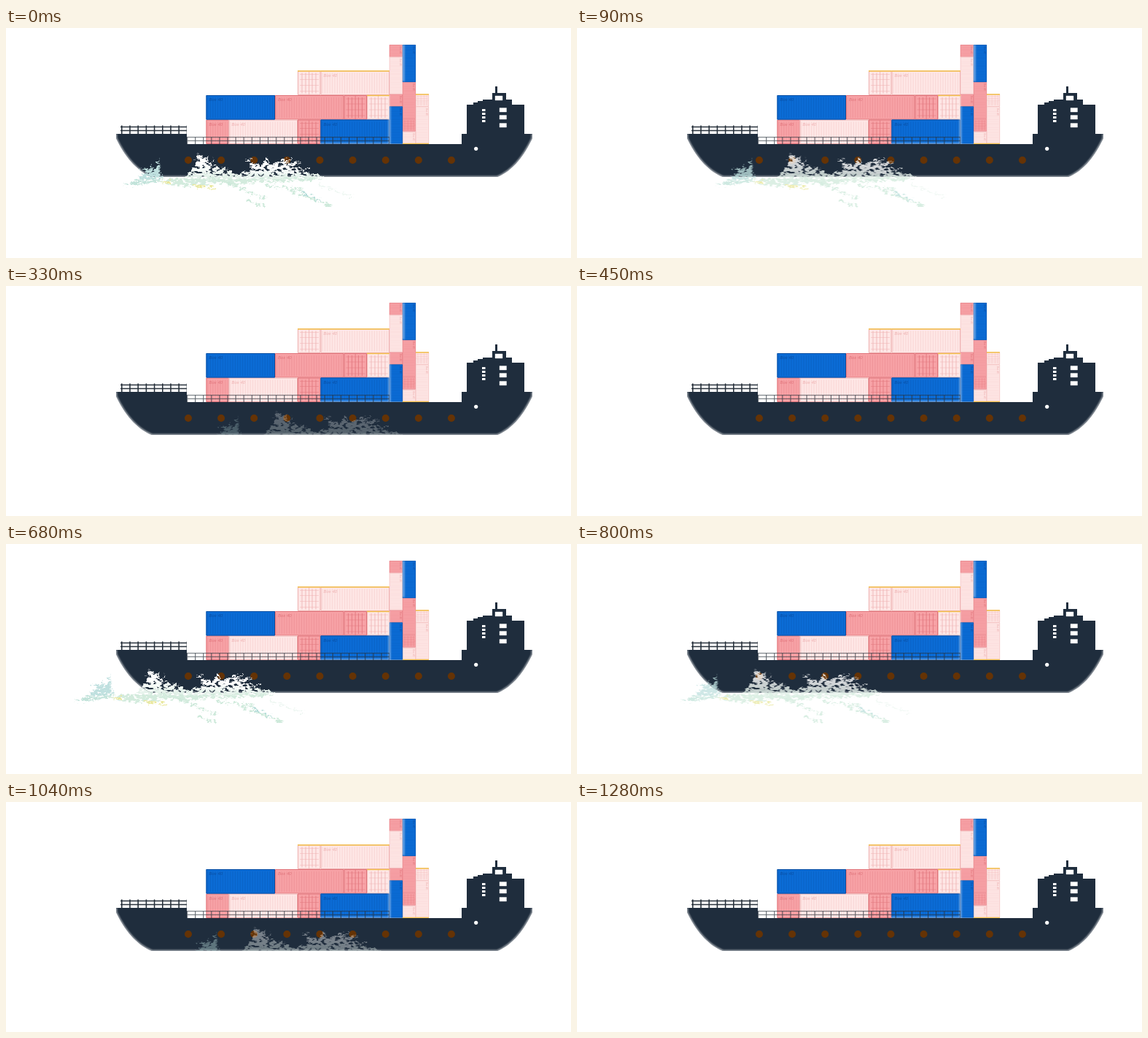
Write an HTML page without scripts that moves like this. It is 775x315 px and loops after 1350 ms.

```html
<!DOCTYPE html>
<html lang="en">
<head>
<meta charset="utf-8">
<title>Cargo ship</title>
<style>
  html, body { margin: 0; width: 100%; height: 100%; overflow: hidden; background: #fff; }
  svg { display: block; width: 775px; height: 315px; }
  text { font: italic 6px "Liberation Sans", Arial, sans-serif; fill: var(--line); }

  .pink { color: #f7a2a6; --line: #e0747b; }
  .pale { color: #fee7e6; --line: #eeb0b0; }
  .blue { color: #0b6cd6; --line: #0a4fa3; }
  .rib { stroke: var(--line); opacity: .3; }
  .frame { fill: none; stroke: var(--line); }
  .gold { stroke: #f3c14b; stroke-width: 1.6; }

  .drift { animation: drift 1350ms infinite; }
  .foam { animation: fade 1350ms infinite; }
  .spray { animation: thin 1350ms infinite; }

  @keyframes drift {
    0% { transform: translateX(67px); animation-timing-function: steps(15); }
    33.333% { transform: translateX(214px); animation-timing-function: step-end; }
    50.37% { transform: translateX(0); animation-timing-function: steps(20); }
    94.81%, 100% { transform: translateX(242px); animation-timing-function: step-end; }
  }
  @keyframes fade {
    0% { opacity: 1; animation-timing-function: steps(15); }
    33.333% { opacity: 0; animation-timing-function: step-end; }
    50.37% { opacity: 1; animation-timing-function: steps(20); }
    94.81%, 100% { opacity: 0; animation-timing-function: step-end; }
  }
  /* Spray over open water vanishes halfway through each pass. */
  @keyframes thin {
    0% { opacity: 1; animation-timing-function: steps(8); }
    17.77% { opacity: .45; animation-timing-function: step-end; }
    17.775%, 50.365% { opacity: 0; animation-timing-function: step-end; }
    50.37% { opacity: 1; animation-timing-function: steps(10); }
    72.59% { opacity: .4; animation-timing-function: step-end; }
    72.595%, 100% { opacity: 0; }
  }
</style>
</head>
<body>
<svg viewBox="0 0 775 315">
  <defs>
    <g id="long">
      <path fill="currentColor" d="M0 0h94.5v33.5H0z"/>
      <path class="rib" d="M2 17h91" stroke-width="28" stroke-dasharray="1 2.4"/>
      <path class="frame" d="M.5 .5h93.5v32.5H.5z"/>
      <text x="4" y="8">Box 40</text>
    </g>
    <g id="short">
      <path fill="currentColor" d="M0 0h31.5v33.5H0z"/>
      <path class="rib" d="M2 17h28" stroke-width="28" stroke-dasharray="1 2.4"/>
      <path class="frame" d="M.5 .5h30.5v32.5H.5z"/>
      <text x="4" y="8">Box 40</text>
    </g>
    <g id="door">
      <path fill="currentColor" d="M0 0h31.5v33.5H0z"/>
      <path class="frame" d="M.5 .5h30.5v32.5H.5z"/>
      <path class="frame" stroke-width=".8" d="M15.7 1v32M6 3v28M11 3v28M20 3v28M25 3v28"/>
      <path class="frame" stroke-width=".7" opacity=".7" d="M3 5h26M3 12h26M3 20h26M3 28h26"/>
    </g>

    <path id="hull" d="M151 145H248V159H625V145H722V151C711 174 696 195 674 204H200C178 195 162 174 151 151Z"/>
    <clipPath id="inHull"><use href="#hull"/></clipPath>

    <filter id="soft" x="-5%" y="-20%" width="110%" height="140%"><feGaussianBlur stdDeviation="1.2"/></filter>
    <filter id="rough" filterUnits="userSpaceOnUse" x="80" y="160" width="350" height="100" color-interpolation-filters="sRGB">
      <feTurbulence type="fractalNoise" baseFrequency=".16 .28" numOctaves="3" seed="7" result="noise"/>
      <feDisplacementMap in="SourceGraphic" in2="noise" scale="11" xChannelSelector="R" yChannelSelector="G" result="torn"/>
      <feColorMatrix in="noise" values="0 0 0 0 0  0 0 0 0 0  0 0 0 0 0  9 0 0 0 -3.1"/>
      <feComposite in="torn" operator="in"/>
    </filter>
    <linearGradient id="crest" x1="0" y1="0" x2="0" y2="1">
      <stop offset=".45" stop-color="#fff"/>
      <stop offset="1" stop-color="#e0f0e7"/>
    </linearGradient>

    <g id="wave" filter="url(#rough)">
      <g fill="#bfe0df">
        <path d="M112 207L126 197L116 190L130 194L132 188L137 194L143 179L145 200L150 206L138 209Z"/>
        <path d="M94 214L112 209L150 206L138 212L122 213L104 217Z" fill="#c2e3da"/>
      </g>
      <path fill="#d3ebdd" d="M140 210Q190 201 240 205T366 204Q352 212 330 209Q304 214 280 210Q250 218 226 212Q180 221 150 213Z"/>
      <g fill="url(#crest)">
        <path d="M172 206L184 201L193 187L197 171L203 179L209 176L211 184L217 182L215 189L226 190L239 193L230 197L247 197L252 206Z"/>
        <path d="M238 207L256 199L273 193L261 180L283 189L291 177L295 187L308 183L328 177L316 186L340 184L322 191L347 193L334 197L362 201L372 206Z"/>
      </g>
      <g fill="none" stroke="#fff" stroke-width="1.3">
        <path d="M280 197L268 178M288 196L290 176M298 196L318 177M304 198L336 181M312 200L350 192M198 198L202 174M206 198L218 179"/>
      </g>
      <g fill="none" stroke="#cde9da" stroke-width="3" stroke-dasharray="9 2">
        <path d="M236 213L262 220M254 220L290 234M264 236L289 245M290 215L340 222M322 222L352 234M350 233L381 244"/>
        <path d="M340 225L364 236" stroke="#b4dcd8"/>
        <path d="M362 214L392 225M384 224L410 231" stroke="#e9f4ee" stroke-width="2"/>
      </g>
      <path fill="none" stroke="#e9e79c" stroke-width="2.4" d="M147 211l12 1M190 216l18 2l15 3"/>
    </g>
  </defs>

  <g class="spray"><use href="#wave" class="drift"/></g>

  <!-- Cargo -->
  <g class="pink">
    <use href="#short" x="274.5" y="125.5"/>
    <use href="#door" x="400" y="125.5"/>
    <use href="#long" x="369" y="92"/>
    <use href="#door" x="463.5" y="92"/>
    <use href="#short" transform="translate(544 23) rotate(90) scale(.54)"/>
    <use href="#short" transform="translate(544 90.5) rotate(90) scale(.54)"/>
    <use href="#long" transform="translate(562 73.5) rotate(90) scale(.54)"/>
    <use href="#door" transform="translate(562 124.5) rotate(90) scale(.54)"/>
  </g>
  <g class="pale">
    <use href="#long" x="305.5" y="125.5"/>
    <use href="#door" x="495" y="92"/>
    <use href="#door" x="400" y="58.5"/>
    <use href="#long" x="431.5" y="58.5"/>
    <use href="#long" transform="translate(544 39.5) rotate(90) scale(.54)"/>
    <use href="#short" transform="translate(562 142) rotate(90) scale(.54)"/>
    <use href="#door" transform="translate(580 90.5) rotate(90) scale(.54)"/>
    <use href="#long" transform="translate(580 107.5) rotate(90) scale(.54)"/>
  </g>
  <g class="blue">
    <use href="#long" x="431.5" y="125.5"/>
    <use href="#long" x="274.5" y="92"/>
    <use href="#long" transform="translate(544 107.5) rotate(90) scale(.54)"/>
    <use href="#long" transform="translate(562 23) rotate(90) scale(.54)"/>
  </g>
  <path class="gold" d="M400 59H526M495 92.5H526M562 91H580M544 158.5H580"/>
  <path d="M526 107V159M545 23V73M526 159H431" fill="none" stroke="#fff" stroke-width="3" opacity=".45" filter="url(#soft)"/>

  <!-- Rails -->
  <g fill="none" stroke="#28323c">
    <path d="M157 135.5H248M157 140.5H248" stroke-width="1.4"/>
    <path d="M158 139.5H248" stroke-width="12" stroke-dasharray="1.6 9.6"/>
    <g opacity=".75">
      <path d="M248 149.5H526M248 154.5H526" stroke-width=".9"/>
      <path d="M248 154H526" stroke-width="10" stroke-dasharray="1.1 10"/>
    </g>
  </g>

  <!-- Hull and bridge -->
  <g fill="#1f2d3d">
    <use href="#hull"/>
    <path d="M632 146V105H641V102H647V100H654V98H667V89H671V80H674V89H686V98H694V105H711V146Z"/>
  </g>
  <g clip-path="url(#inHull)">
    <path d="M151 145V151C162 174 178 195 200 204H674C696 195 711 174 722 151V145" fill="none" stroke="#fff" stroke-width="2.6" opacity=".65" filter="url(#soft)"/>
  </g>
  <path d="M250 181H612" stroke="#653305" stroke-width="10" stroke-linecap="round" stroke-dasharray="0 45.12"/>
  <g fill="#fff">
    <path d="M671 93h10v6h-10zM677 109.500h9.500v5.500h-9.500zM677 119.500h9.500v5.500h-9.500zM677 130.500h9.500v5.500h-9.500z" stroke="#fff" stroke-opacity=".35"/>
    <path d="M653 111h4.500v3h-4.500zM653 116h4.500v3h-4.500zM653 121h4.500v3h-4.500zM653 126h4.500v3h-4.500z"/>
    <circle cx="644.700" cy="165.300" r="2.600"/>
  </g>

  <g clip-path="url(#inHull)"><g class="foam"><use href="#wave" class="drift"/></g></g>
</svg>
</body>
</html>
```
